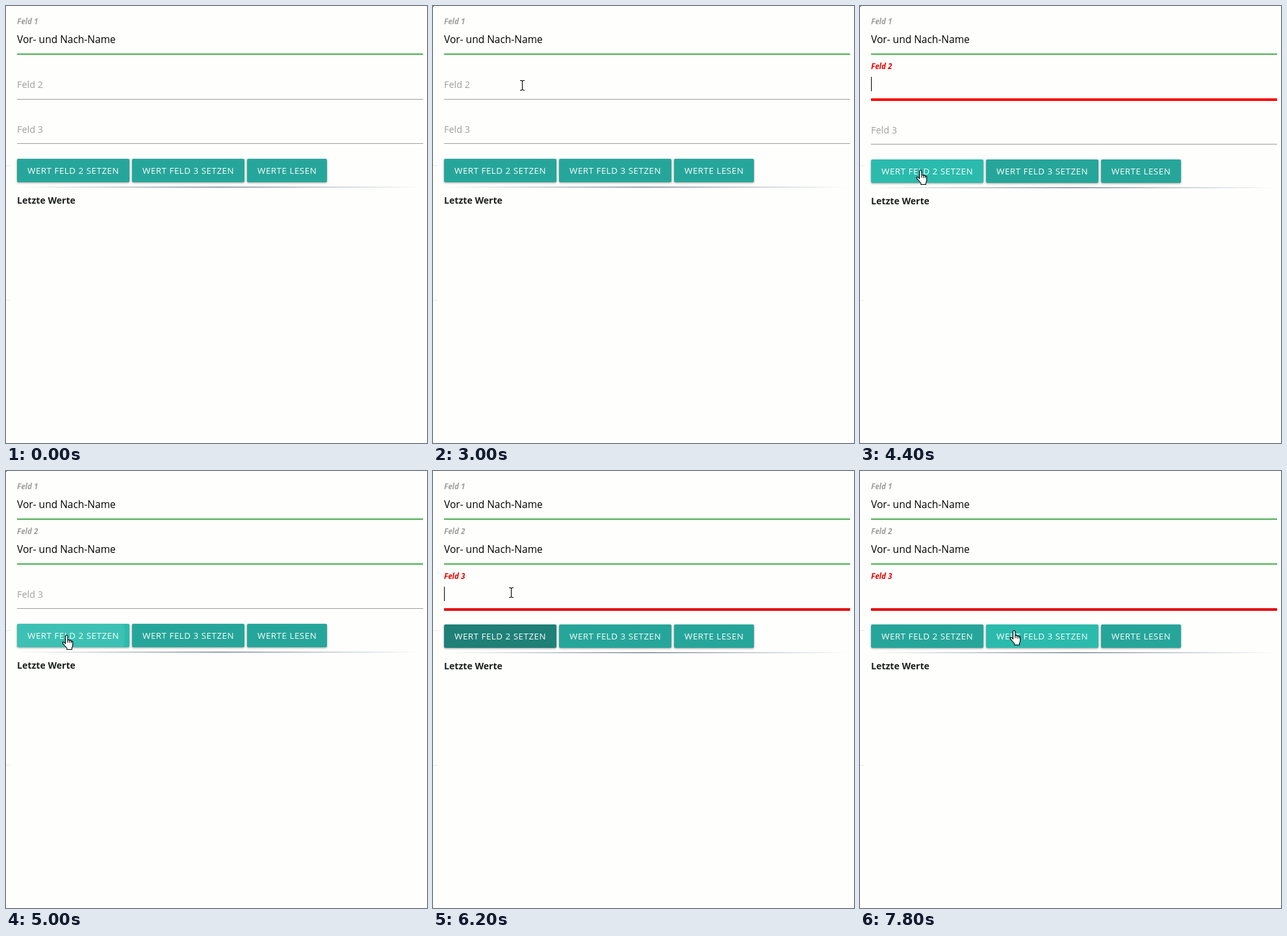
Write an HTML page that moves like this. It is 648 px wide and 672 px high and loops after 8000 ms.

```html
<!DOCTYPE html>
<html lang="de">
<head>
<meta charset="utf-8">
<title>Formular</title>
<style>
  html, body { margin: 0; width: 100%; height: 100%; overflow: hidden; background: #fefffd; }
  svg { display: block; font-family: "Open Sans", "Noto Sans", sans-serif; }
  .label { font: italic bold 11.6px "Open Sans", "Noto Sans", sans-serif; }
  .hint { font-size: 14.4px; fill: #9e9e9e; }
  .value { font-size: 15.5px; fill: #000; }
  .btn rect { filter: drop-shadow(0 1px 1.5px rgba(0,0,0,.4)); }
  .btn text { font-size: 13.4px; letter-spacing: .5px; fill: #fff; }
  .head { font-size: 14.1px; font-weight: bold; fill: #1c1f1e; }
</style>
</head>
<body>
<svg id="stage" width="648" height="672" viewBox="0 0 648 672">
  <defs>
    <linearGradient id="rule">
      <stop offset="0" stop-color="#46586a" stop-opacity="0"/>
      <stop offset=".5" stop-color="#46586a"/>
      <stop offset="1" stop-color="#46586a" stop-opacity="0"/>
    </linearGradient>
    <clipPath id="clip"><rect x="17" y="235" width="173" height="36" rx="2"/></clipPath>
  </defs>
  <rect width="648" height="672" fill="#fefffd"/>
  <path d="M0 245.5H7M0 452.5H7" stroke="#e9ebe9"/>
</svg>
<script>
const LOOP = 8000, STEP = 200;
const GREEN = "#4caf50", GREY = "#9e9e9e", TEAL = "#26a69a", LIGHT = "#2bbbad", DARK = "#1f8078";
const stage = document.getElementById("stage");

function add(tag, attrs, parent = stage, text = "") {
  const el = document.createElementNS("http://www.w3.org/2000/svg", tag);
  set(el, attrs);
  el.textContent = text;
  parent.append(el);
  return el;
}
function set(el, attrs) {
  for (const key in attrs) el.setAttribute(key, attrs[key]);
}
const show = (el, on) => set(el, { visibility: on ? "visible" : "hidden" });

const fields = [0, 1, 2].map(i => {
  const g = add("g", {}), y = 69 * i, name = "Feld " + (i + 1);
  return {
    g, y,
    label: add("text", { class: "label", x: 17, y: 28 + y }, g, name),
    hint: add("text", { class: "hint", x: 17, y: 57 + y }, g, name),
    value: add("text", { class: "value", x: 17, y: 57 + y }, g, "Vor- und Nach-Name"),
    caret: add("rect", { x: 17, y: 40 + y, width: 1, height: 22 }, g),
    line: add("rect", { x: 17, width: 625 }, g)
  };
});

const lower = add("g", {});
const buttons = [[17, 173, "WERT FELD 2 SETZEN"], [194, 173, "WERT FELD 3 SETZEN"], [371, 123, "WERTE LESEN"]]
  .map(([x, width, text]) => {
    const g = add("g", { class: "btn" }, lower);
    const box = add("rect", { x, y: 235, width, height: 36, rx: 2 }, g);
    add("text", { x: x + 16, y: 258 }, g, text);
    return box;
  });
const ripple = add("circle", { cx: 93, cy: 253, fill: "#fff", "clip-path": "url(#clip)" }, lower);
add("rect", { x: 17, y: 278, width: 625, height: 1, fill: "url(#rule)" }, lower);
add("text", { class: "head", x: 17, y: 304 }, lower, "Letzte Werte");

const dot = add("rect", { width: 1, height: 1 });
const outline = { fill: "#fff", stroke: "#000", "stroke-width": 1.1, "stroke-linejoin": "round" };
const pointers = {
  beam: add("path", { d: "M-3 -7.5H-1L.5 -6.5L2 -7.5H4M.5 -6.5V6.5M-3 7.5H-1L.5 6.5L2 7.5H4", fill: "none", stroke: "#000", "stroke-width": 1.1 }),
  arrow: add("path", { d: "M.5 .5V16L4 12.6L6.4 18L8.8 17L6.5 11.7H11.5Z", ...outline }),
  hand: add("path", {
    d: "M-1.5 13.5V2.2a1.7 1.7 0 0 1 3.4 0V8q1.7-1 3 .7 1.7-.8 2.7.8 1.9-.3 2.1 1.7V16q0 2-1.3 3.8V22.5H.8V20.5L-3.5 15.5Q-7 11.8-5.2 11-3.8 10.4-1.5 13.5ZM1.9 8V12M4.9 9V12.4M7.6 9.8V12.6",
    ...outline
  })
};

// time, pointer, x, y
const track = [
  [0, "", 0, 0], [200, "hand", 310, 235], [400, "beam", 21, 201],
  [2200, "beam", 24, 193], [2400, "beam", 48, 180], [2600, "beam", 84, 159], [2800, "beam", 118, 136],
  [3000, "beam", 137, 122], [3200, "beam", 143, 119], [3400, "beam", 143, 123],
  [3600, "beam", 140, 131], [3800, "beam", 129, 160], [4000, "arrow", 111, 214], [4200, "hand", 98, 246],
  [4400, "hand", 93, 252], [5200, "hand", 96, 248], [5400, "arrow", 107, 218], [5600, "beam", 115, 200],
  [5800, "beam", 117, 194], [6000, "beam", 119, 189], [6200, "beam", 120, 187],
  [7000, "beam", 123, 190], [7200, "beam", 150, 202], [7400, "arrow", 203, 226],
  [7600, "hand", 230, 243], [7800, "hand", 237, 245]
];

const within = (t, from, to) => t >= from && t < to;
const blink = (t, start) => (t - start) % 1060 < 530;

function drawField(f, mode, caret, red = "#e60000", thin = false) {
  const bad = mode === "bad", empty = mode === "empty";
  show(f.hint, empty);
  show(f.label, !empty);
  show(f.value, mode === "ok");
  show(f.caret, caret);
  set(f.label, { fill: bad ? "#e60000" : GREY });
  set(f.line, {
    y: 73 + f.y + (thin ? 1 : 0),
    height: empty ? 1 : bad ? (thin ? 3 : 4) : 2,
    fill: empty ? GREY : bad ? red : GREEN
  });
}

function draw(t) {
  const bad2 = within(t, 3400, 4800), bad3 = t >= 6200;
  drawField(fields[0], "ok", false);
  drawField(fields[1], bad2 ? "bad" : t >= 4800 ? "ok" : "empty",
    within(t, 3400, 4600) && blink(t, 3300), t < 3600 ? "#e81414" : "#ff0000", t < 3600);
  drawField(fields[2], bad3 ? "bad" : "empty", bad3 && blink(t, 6200));
  set(fields[2].g, { transform: `translate(0 ${bad2 ? 1 : 0})` });
  set(lower, { transform: `translate(0 ${bad2 || bad3 ? 1 : 0})` });

  const fill2 = within(t, 4200, 5400) ? LIGHT : within(t, 5400, 6400) ? DARK : TEAL;
  [fill2, t >= 7600 ? LIGHT : TEAL, TEAL].forEach((fill, i) => set(buttons[i], { fill }));
  const age = (t - 4600) / 600;
  set(ripple, { r: Math.max(0, 30 + age * 90), opacity: within(age, 0, 1) ? .25 * (1 - age) : 0 });

  show(dot, within(t, 200, 6000));
  const [, kind, x, y] = track.findLast(k => k[0] <= t);
  for (const name in pointers) show(pointers[name], name === kind);
  if (kind) set(pointers[kind], { transform: `translate(${x} ${y})` });
}

const start = performance.now();
function tick() {
  const t = (performance.now() - start) % LOOP;
  draw(Math.floor(t / STEP) * STEP);
  requestAnimationFrame(tick);
}
tick();
</script>
</body>
</html>
```
